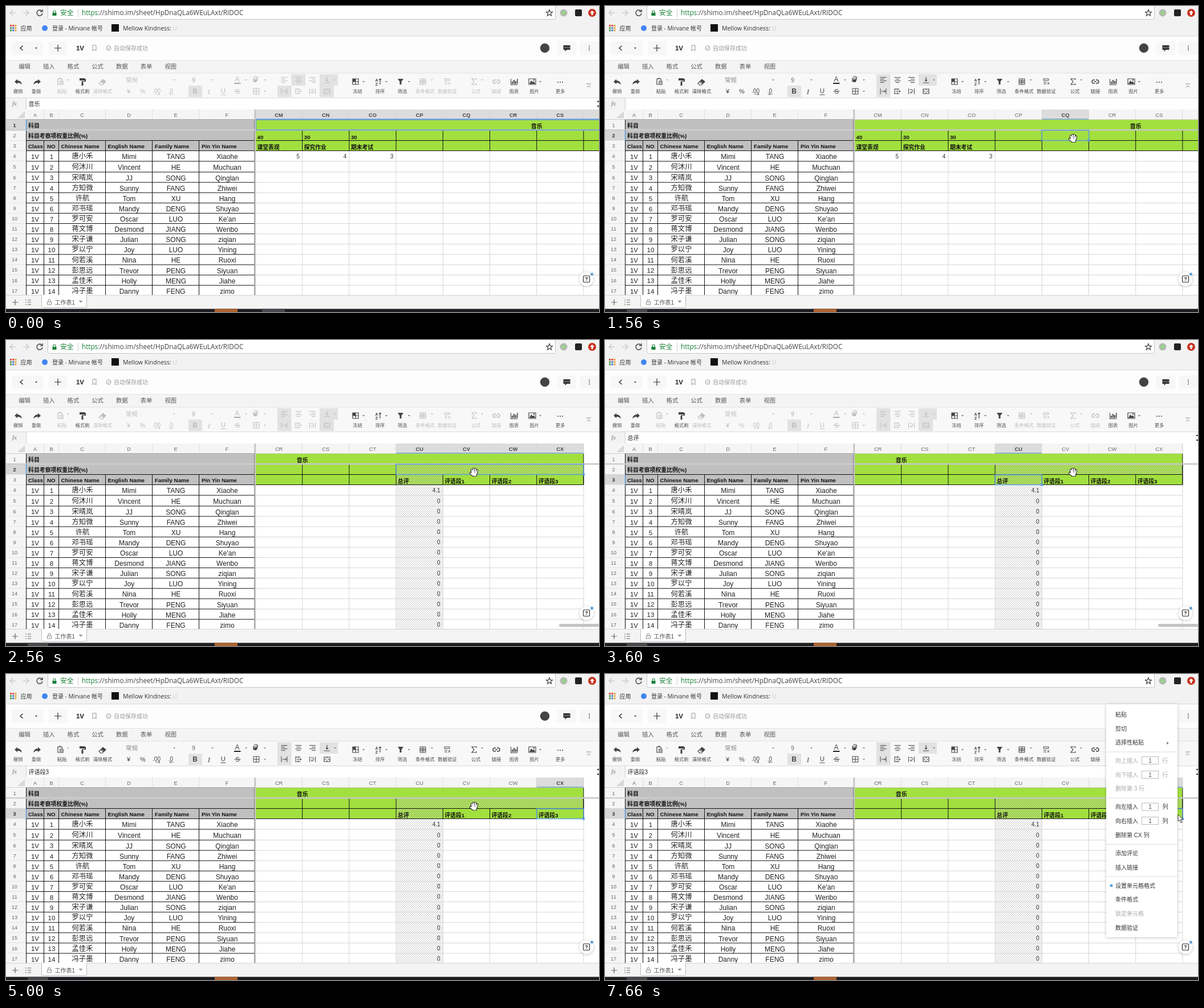
Write an HTML page that moves like this. It is 1040 by 538 pixels and loops after 8 s.

```html
<!DOCTYPE html>
<html lang="zh">
<head>
<meta charset="utf-8">
<title>Sheet</title>
<style>
html, body { margin: 0; width: 100%; height: 100%; overflow: hidden; background: #fff; }
svg { display: block; width: 1040px; height: 538px; font-family: "Liberation Sans", "Noto Sans CJK SC", "Noto Sans CJK", sans-serif; }
text { white-space: pre; }
.m { text-anchor: middle; }
.e { text-anchor: end; }
.b { font-weight: 700; }
.i { font-style: italic; }
.serif { font-family: "Liberation Serif", serif; }
.url { font-family: "Open Sans", "Noto Sans CJK SC", sans-serif; }
</style>
</head>
<body>
<svg id="stage" viewBox="0 0 1040 538"></svg>
<script>
const GREEN = '#a2e03f', BLUE = '#5b9be0', DARK = '#444', DIM = '#bdbdbd';
const COLS = ['CM', 'CN', 'CO', 'CP', 'CQ', 'CR', 'CS', 'CT', 'CU', 'CV', 'CW', 'CX'];
const PUPILS = `唐小禾 Mimi TANG Xiaohe
何沐川 Vincent HE Muchuan
宋晴岚 JJ SONG Qinglan
方知微 Sunny FANG Zhiwei
许航 Tom XU Hang
邓书瑶 Mandy DENG Shuyao
罗可安 Oscar LUO Ke'an
蒋文博 Desmond JIANG Wenbo
宋子谦 Julian SONG ziqian
罗以宁 Joy LUO Yining
何若溪 Nina HE Ruoxi
彭思远 Trevor PENG Siyuan
孟佳禾 Holly MENG Jiahe
冯子墨 Danny FENG zimo`.split('\n').map(s => s.split(' '));

// Each entry changes part of the state from its time on.
const TIMELINE = [
  [0, { scroll: 0, sel: [0, 11, 1], text: '音乐', off: true, align: 1, merge: true, task: 449 }],
  [200, { task: 38, cur: [480, 522] }],
  [390, { cur: [560, 440] }],
  [600, { cur: [680, 340] }],
  [800, { cur: [780, 262] }],
  [1000, { cur: [821, 233] }],
  [1180, { sel: [4, 4, 2], text: '', glow: true }],
  [1320, { off: false, align: 0, merge: false }],
  [1560, { glow: false }],
  [1950, { sel: [5, 5, 2] }],
  [2150, { sel: [6, 6, 2] }],
  [2350, { sel: [7, 7, 2], scroll: 1, bar: 905 }],
  [2560, { sel: [8, 11, 2], scroll: 5, bar: 970, off: true, merge: true }],
  [3600, { sel: [8, 8, 3], text: '总评' }],
  [3780, { bar: 0 }],
  [4380, { sel: [9, 9, 3], text: '评语段1', off: false, merge: false }],
  [4590, { sel: [10, 10, 3], text: '评语段2' }],
  [5000, { sel: [11, 11, 3], text: '评语段3' }],
  [5440, { cur: [835, 262] }],
  [5640, { cur: [880, 318] }],
  [5840, { cur: [930, 335] }],
  [6040, { cur: [965, 318] }],
  [6240, { cur: [985, 290] }],
  [6450, { cur: [995, 268] }],
  [6650, { cur: [1005, 253], glow: true }],
  [6860, { menu: true, cur: [1005, 247] }],
  [7060, { glow: false }]
];

const rect = (x, y, w, h, fill, more = '') =>
  `<rect x="${x}" y="${y}" width="${w}" height="${h}" fill="${fill}" ${more}/>`;
const circle = (x, y, r, fill, more = '') => `<circle cx="${x}" cy="${y}" r="${r}" fill="${fill}" ${more}/>`;
// y is the visual middle of the text
const text = (x, y, s, size = 10, fill = '#333', cls = '') =>
  `<text x="${x}" y="${y + size * .36}" font-size="${size}" fill="${fill}" class="${cls}">${s}</text>`;
const path = (x, y, d, stroke = DARK, fill = 'none', width = 1.2) =>
  `<path transform="translate(${x} ${y})" d="${d}" stroke="${stroke}" fill="${fill}" stroke-width="${width}"/>`;
const solid = (x, y, d, c = DARK) => path(x, y, d, 'none', c);
const hline = (x, y, x2, c, w = 1) => rect(x, y - w / 2, x2 - x, w, c);
const vline = (x, y, y2, c, w = 1) => rect(x - w / 2, y, w, y2 - y, c);
const drop = (x, y, c) => solid(x, y, 'M-2-1h4l-2 2.4z', c);
const range = (n, f) => Array.from({ length: n }, (_, i) => f(i)).join('');

const bottom = r => r < 6 ? [199.5, 218, 236.5, 254.5, 273, 292][r] : 292 + 18.1 * (r - 5);
const middle = r => r < 6 ? [0, 210, 228, 246, 264, 283][r] : 301.3 + 18.1 * (r - 6);

function browser() {
  const hues = ['#e04a3f', '#e04a3f', '#e8a33d', '#4a9a52', '#3f7fd0', '#e8a33d', '#4a9a52', '#3f7fd0', '#e8a33d'];
  return rect(0, 0, 1040, 53, '#f2f2f2') + rect(73.5, -2, 890, 25.5, '#fff', 'stroke="#c4c4c4" rx="2"')
    + path(12, 12, 'M5 0H-5M0-5L-5 0L0 5', '#ccc', 'none', 1.5)
    + path(35, 12, 'M-5 0H5M0-5L5 0L0 5', '#ccc', 'none', 1.5)
    + path(59, 12, 'M4-3A5 5 0 1 0 5 1M5-6v4h-4', '#555', 'none', 1.6)
    + solid(85, 13, 'M-3.5-1h7v5h-7z', '#188038') + path(85, 13, 'M-2-1v-2a2 2 0 0 1 4 0v2', '#188038')
    + text(95, 12, '安全', 11.8, '#188038') + vline(126.5, 5, 20, '#ccc')
    + text(133, 12, '<tspan fill="#188038">https</tspan>://shimo.im/sheet/HpDnaQLa6WEuLAxt/RIDOC', 11.7, '#444', 'url')
    + path(953, 12, 'M0-5.5L1.5-1.7 5.5-1.5 2.4 1 3.5 5 0 2.7-3.5 5-2.4 1-5.5-1.5-1.5-1.7z', '#444')
    + circle(978, 12, 6.5, '#b5b5b5') + circle(978, 12, 4, '#9bd08f')
    + rect(998, 6, 12, 12, '#222', 'rx="2"')
    + circle(1028, 12, 7, '#c8321f') + solid(1028, 12, 'M0-4L4 0H1.5V4h-3V0H-4z', '#fff')
    + hues.map((c, i) => rect(7 + i % 3 * 4.2, 33 + (i / 3 | 0) * 4.2, 3, 3, c)).join('')
    + text(25.5, 39, '应用') + circle(68, 39, 5, '#4285f4')
    + text(81, 39, '登录 - Mirvane 帐号', 10, '#333', 'url')
    + rect(185, 32, 13, 13, '#111')
    + text(205, 39, 'Mellow Kindness: <tspan fill="#ccc">U</tspan>', 10.5, '#333', 'url')
    + hline(0, 53, 1040, '#d0d0d0');
}

function header() {
  const tabs = ['编辑', '插入', '格式', '公式', '数据', '表单', '视图'];
  const panel = (x, w) => rect(x, 62, w, 24, '#f7f7f7', 'rx="2"');
  return rect(0, 53.5, 1040, 42, '#fdfdfd') + panel(10, 55) + panel(75, 32) + panel(967, 33) + panel(1007, 33)
    + path(27, 74, 'M2.5-4L-2 0l4.500 4', '#333', 'none', 1.5) + drop(53, 74, '#333')
    + path(91, 74, 'M-6 0H6M0-6V6', '#333') + text(130, 74, '1V', 11.5, '#222', 'm b')
    + path(155, 74, 'M-3-5h6v10l-3-3-3 3z', '#999', 'none', 1)
    + circle(180, 74, 4, 'none', 'stroke="#999"') + path(180, 74, 'M-2 0l1.500 1.500 3-3', '#999', 'none', 1)
    + text(189, 74, '自动保存成功', 10, '#999')
    + circle(945, 74, 8.2, '#444')
    + solid(983.500, 74, 'M-6-5h12v8h-6l-3 3v-3h-3z', '#333')
    + [-3.500, 0, 3.500].map(d => circle(984 + d, 73, .8, '#fff') + circle(1023, 74 + d, .9, '#444')).join('')
    + rect(0, 95.5, 1040, 22.500, '#f4f4f4') + hline(0, 95.500, 1040, '#e4e4e4')
    + tabs.map((s, i) => text(32.500 + 42.700 * i, 106, s, 10.3, '#555', 'm')).join('');
}

function toolbar({ off, align, merge }) {
  const c = off ? DIM : DARK;
  const box = (x, y, w) => rect(x, y, w, 20, '#e2e2e2');
  const bars = (x, y, shift) => range(4, i => {
    const w = i % 2 ? 7 : 11;
    return hline(x - 5.5 + (11 - w) * shift / 2, y - 4.500 + i * 3, x - 5.5 + (11 - w) * shift / 2 + w, c);
  });
  const grid = 'M-5-5H5V5H-5zM-5 0H5M0-5V5', undo = 'M-7-1l5-4.500v2.500q7 0 8 7.500q-3-4-8-3.500v2.500z';
  const labels = [
    [21, '撤销'], [53, '重做'], [98, '粘贴', c], [134, '格式刷'], [169.500, '清除格式', c], [616.500, '冻结'], [656, '排序'],
    [695, '筛选'], [735, '条件格式', c], [774, '数据验证', c], [824, '公式', c], [860, '链接', c], [891, '图表'],
    [926.500, '图片'], [972, '更多']];
  return rect(0, 118, 1040, 43.500, '#f8f8f8') + hline(0, 118, 1040, '#e2e2e2') + hline(0, 161.500, 1040, '#d8d8d8')
    + labels.map(([x, s, col = '#555']) => text(x, 150, s, 8.4, col, 'm')).join('')
    + solid(22, 134, undo) + `<g transform="matrix(-1 0 0 1 54 134)">${solid(0, 0, undo)}</g>`
    + path(95, 133, 'M3-2v-3h-7V5h3M-2-6h3M0-1h5v6h-5zM1.500 1h2M1.500 3h2', c)
    + solid(134, 133, 'M-5-6h9v4h-9zM4-5h2v5h-5v2h-2v-3h5zM-1.500 1h3v6h-3z')
    + path(169, 134, 'M-6 2L1-5l5 4-6 6h-3zM-3-1l5 4', c) + solid(169, 134, 'M-2-2L1-5l5 4-3 3.500z', c)
    + text(210, 130, '常规', 10.5, off ? DIM : '#888')
    + text(215, 150, '¥', 11, c, 'm') + text(240, 150, '%', 11, c, 'm')
    + text(264, 149, '.00', 10, c, 'm') + text(289, 149, '.0', 10, c, 'm')
    + path(266, 155, 'M-4 0h8M2-2l2 2-2 2', c, 'none', .8) + path(290, 155, 'M4 0h-7M-1-2l-2 2 2 2', c, 'none', .8)
    + text(329, 130, '9', 10, off ? '#aaa' : '#666', 'm')
    + box(320, 140, 24) + text(331.500, 150, 'B', 12, c, 'm b') + text(356, 150, 'I', 13, c, 'm i serif')
    + text(381, 149, 'U', 11.500, c, 'm') + hline(376.500, 156, 385.500, c)
    + text(406, 150, 'S', 11.500, c, 'm') + hline(400.500, 150, 411.500, c)
    + text(405.500, 129, 'A', 12, c, 'm') + hline(400, 136, 411.500, off ? '#aaa' : '#222', 2)
    + path(438, 129, 'M-4-2h7l-3 6h-4zM-3-5h5l2 3', c) + solid(438, 129, 'M-4 0h8l-3 5h-3z', c)
    + path(439, 150, grid, c, 'none', 1)
    + box(476 + 24.500 * align, 120, 24.500) + box(550, 120, 32) + box(476, 140, 24.500) + (merge ? box(550, 140, 25) : '')
    + bars(488, 130, 0) + bars(513, 130, 1) + bars(537.500, 130, 2)
    + path(563, 130, 'M-5 5H5M0-5V2M-2 0l2 2 2-2', c)
    + path(488, 150, 'M-5-5V5M5-5V5M-3 0H4M2-2l2 2-2 2', c, 'none', 1)
    + path(513, 150, 'M-5-5V5M0-5v3M0 2v3M-3 0H5M3-2l2 2-2 2M-5-4h8M-5 4h8', c, 'none', 1)
    + path(537.500, 150, 'M-5-5V5M5-5V5M-3-3H1q3 3 0 5h-3M0 0l-2 2 2 2', c, 'none', 1)
    + path(563, 150, 'M-5-4H5V4H-5zM0-4v2M0 2v2M-4 0h3M4 0H1', c)
    + path(613, 133, grid) + solid(613, 133, 'M-5-5H0V0H-5z')
    + text(650, 130, 'A', 7, DARK, 'm b') + text(650, 137, 'Z', 7, DARK, 'm b') + path(656, 133, 'M0 5V-5M-2-3l2-2 2 2')
    + solid(692, 133, 'M-5-5H5L1.500 0v5h-3v-5z')
    + path(731, 133, grid + 'M-5-2H5M-5 2H5', c, 'none', 1)
    + path(774, 133, 'M-5-5H4V-2H-5zM-5 1H0M-5 4H0M2 1l3 4M5 1l-3 4', c, 'none', 1)
    + path(821, 133, 'M4-3v-2H-4L0 0-4 5H4V3', c)
    + path(860, 133, 'M-1-3h-2a3 3 0 0 0 0 6h2M1-3h2a3 3 0 0 1 0 6h-2M-2 0h4', c, 'none', 1.4)
    + solid(891, 133, 'M-6-5h1V5H6v1H-6zM-4 0h2v4h-2zM-1-3h2v7h-2zM2-1h2v5h-2zM5-5h1.500v9h-1.500z')
    + path(923, 133, 'M-6-5H6V5H-6z') + solid(923, 133, 'M-5 4l3-6 3 3 2-2 2 5zM2-4h2v2h-2z')
    + [968, 972, 976].map(x => circle(x, 134, 1, DARK)).join('')
    + path(1022, 140, 'M-4-3h8M-3 3l3-3 3 3', '#888', 'none', 1)
    + [109, 295, 362, 421, 454, 577, 747, 835].map(x => drop(x, 130, x === 109 ? DIM : off ? '#c4c4c4' : '#888')).join('')
    + drop(454, 150, off ? '#c4c4c4' : '#888')
    + [627, 667, 707, 937].map(x => drop(x, 133, '#777')).join('');
}

function formulaBar({ text: value }) {
  return rect(0, 162, 1040, 20, '#fff') + rect(0, 162, 35, 20, '#f3f3f3') + vline(35.500, 162, 182, '#d0d0d0')
    + text(15, 171, 'fx', 11, '#777', 'm i serif') + text(39.500, 172, value, 10, '#222')
    + (value ? solid(1038, 168, 'M-2 1h5L.500-2z') + solid(1038, 176, 'M-2-1h5L.500 2z') : '');
}

function columnHead(x, w, label, on) {
  return rect(x, 182, w, 17.500, on ? '#dcdcdc' : '#f5f5f5') + vline(x + w, 182, 199.500, '#c8c8c8')
    + text(x + w / 2, 191.500, label, 9.3, on ? '#444' : '#666', on ? 'm b' : 'm')
    + (on ? hline(x, 199, x + w, BLUE, 1.500) : '');
}

function scrollPane({ scroll, sel: [from, to, row], bar }) {
  const at = i => 437.500 + 82.200 * (i - scroll), end = at(12), last = Math.min(end, 1040);
  const rows = [['40', '30', '30'], ['课堂表现', '探究作业', '期末考试', '', '', '', '', '', '总评', '评语段1', '评语段2', '评语段3']];
  const left = Math.max(at(from), 438.500), top = bottom(row - 1) + .5, h = bottom(row) - top;
  const hatch = (x, y, w, h) => rect(x, y, w, h, 'url(#hatch)');
  return rect(437, 182, 603, 326, '#fff') + rect(437, 200, last - 437, 54.500, GREEN)
    + hatch(at(8), 219, 328.800, 17.500) + hatch(at(8), 237, 82.200, 271)
    + COLS.map((name, i) => columnHead(at(i), 82.200, name, i >= from && i <= to)).join('')
    + hline(437, 199.500, last, '#b8b8b8', .6)
    + range(14, i => hline(437, bottom(i + 4), last, '#d6d6d6'))
    + range(12, i => vline(at(i + 1), 255, 508, '#d6d6d6')
      + vline(at(i + 1), i > 7 && i < 11 ? 237 : 219, 254.500, '#111'))
    + vline(end, 200, 254.500, '#111') + hline(437, 236.500, last, '#111') + hline(437, 254.500, last, '#111')
    + text(at(6), 211.500, '音乐', 10, '#111', 'm b')
    + rows.map((list, r) => list.map((s, i) => text(at(i) + 3, 230 + 18 * r, s, 9.8, '#111', 'b')).join('')).join('')
    + [5, 4, 3].map((n, i) => text(at(i) + 77.500, 264, n, 10, '#333', 'e')).join('')
    + range(14, i => text(at(8) + 77.500, middle(i + 4), i ? 0 : '4.1', 10, '#333', 'e'))
    + hline(0, 218, 1040, '#c6c6c6', 2.500)
    + rect(left, top, at(to + 1) - left, h, 'none', `stroke="${BLUE}" stroke-width="1.5"`)
    + rect(at(to + 1) - 2, top + h - 2, 4, 4, BLUE)
    + (bar ? rect(bar, 499, 1040 - 970, 5.500, '#c4c4c4', 'rx="2.500"') : '');
}

function fixedPane({ sel: [, , row] }) {
  const edges = [35.500, 66.500, 92.500, 174.500, 256.500, 338.500, 436], mids = [51, 80, 134, 216, 298, 388];
  const titles = ['Class', 'NO', 'Chinese Name', 'English Name', 'Family Name', 'Pin Yin Name'];
  return rect(0, 182, 436.500, 326, '#fff') + rect(35.500, 200, 401, 54.500, '#c0c0c0')
    + [...'ABCDEF'].map((s, i) => columnHead(edges[i], edges[i + 1] - edges[i], s)).join('')
    + rect(0, 182, 35.500, 18, '#f5f5f5') + solid(33, 197, 'M0 0V-12L-13 0z', '#d8d8d8')
    + hline(0, 199.500, 437, '#a8a8a8')
    + range(17, i => {
      const r = i + 1, on = r === row, top = bottom(i);
      return rect(0, top, 35, bottom(r) - top, on ? '#d6d6d6' : '#f5f5f5') + hline(0, bottom(r), 35, '#d4d4d4')
        + text(15, middle(r), r, 9, on ? '#333' : '#666', on ? 'm b' : 'm');
    })
    + range(16, i => hline(35, bottom(i + 2), 436, '#111'))
    + edges.map((x, i) => vline(x, i % 6 ? 236.500 : 200, 508, '#111')).join('')
    + text(39, 210, '科目', 9.900, '#111', 'b') + text(39, 228, '科目考察项权重比例(%)', 9.900, '#111', 'b')
    + titles.map((s, i) => text([39, 72, 96.500, 178.500, 261, 343][i], 246, s, 9.750, '#111', 'b')).join('')
    + PUPILS.map((p, i) => ['1V', i + 1, ...p].map((s, k) =>
      text(mids[k], middle(i + 4) + (k === 2 ? 0 : 1), s, k === 2 ? 12.300 : k < 2 ? 11.500 : 12, '#222', 'm')).join('')).join('')
    + hline(0, 218, 437, '#cdcdcd', 2.500) + vline(437, 182, 508, '#c4c4c4', 2.500)
    + vline(35.500, bottom(row - 1), bottom(row), BLUE, 1.500);
}

function footer({ task }) {
  return rect(0, 508, 1040, 25, '#f4f4f4') + hline(0, 508.500, 1040, '#d4d4d4')
    + path(16, 521, 'M-5 0H5M0-5V5', '#666') + path(39, 521, 'M-5-4h2M-1-4h6M-5 0h2M-1 0h6M-5 4h2M-1 4h6', '#666')
    + path(62.500, 508, 'M0 0V20q0 2 2 2H77q2 0 2-2V0', '#bbb', '#fff', 1)
    + path(76, 521, 'M-3.500-1h7v5h-7zM-2-1v-2a2 2 0 0 1 4 0v2M0 1v1', '#888', 'none', 1)
    + text(85.500, 521, '工作表1', 10, '#555') + solid(131, 520, 'M-3.500-2h7l-3.500 4z', '#999')
    + circle(1018, 480, 12, '#fff', 'filter="url(#shade)"') + rect(1012.500, 474.500, 11, 11, 'none', 'stroke="#333" stroke-width="1.2" rx="1"')
    + text(1018, 480, '?', 9, '#222', 'm b') + circle(1027.500, 471.500, 2.500, '#5a9fd8')
    + rect(0, 532.500, 1040, 6, '#1d1d22') + rect(366, 532.500, 40, 6, '#ad632f') + rect(task, 532.500, task < 99 ? 36 : 40, 6, '#48484c')
    + text(971, 540.500, '20:20', 9, '#ddd', 'm');
}

function contextMenu() {
  const items = [[71, '粘贴'], [96, '剪切'], [120, '选择性粘贴'], [152, '向上插入', '行', 1], [177, '向下插入', '行', 1],
    [201, '删除第 3 行', '', 1], [233.500, '向左插入', '列'], [258, '向右插入', '列'], [283, '删除第 CX 列'], [315, '添加评论'],
    [340, '插入链接'], [372, '设置单元格格式'], [396, '条件格式'], [421, '锁定单元格', '', 1], [446, '数据验证']];
  return rect(879, 53, 125, 409.500, '#fff', 'filter="url(#shade)"')
    + [137, 218, 299.500, 356].map(y => hline(879, y, 1004, '#ddd')).join('')
    + items.map(([y, label, unit, dim]) => {
      const c = dim ? '#aaa' : '#333';
      return text(895, y, label, 10, c) + (unit ? rect(941.500, y - 6.500, 29, 13, '#fff', 'stroke="#bbb"')
        + text(956, y, 1, 10, '#555', 'm') + text(977.500, y, unit, 10, c) : '');
    }).join('')
    + solid(987, 121.500, 'M-1.500-2.500v5l3-2.500z', '#666') + circle(888, 372, 2.500, '#5a9fd8');
}

function cursor({ cur, glow, menu }) {
  if (!cur) return '';
  const [x, y] = cur, spot = glow ? circle(x + 1, menu ? 252.500 : y, 9, '#f0e31c', 'opacity=".85"') : '';
  if (menu) return spot + path(x, y, 'M0 0V12l2.800-2.500 2.200 5 2-1-2.200-4.700h4z', '#222', '#fff', .9);
  const fingers = glow ? 'M-4 1V-2M-1.400 0V-3M1.400 0V-3M4 1V-2M-4 3L-5 1'
    : 'M-3 1L-4-4M-1 0L-1.300-6M1.700 0L2-6M4 1L5-3.500M-3 4L-6 1';
  const hand = (c, w) => path(x, y, fingers + 'M-2.500 2H3V5H-1.500z', c, c, w);
  return spot + `<g stroke-linecap="round" stroke-linejoin="round">${hand(glow ? '#6b6410' : '#111', 4.200)}${hand('#fff', 2.300)}</g>`;
}

const defs = `<defs><pattern id="hatch" width="4" height="4" patternUnits="userSpaceOnUse">
  <path d="M0 0h2v2H0zM2 2h2v2H2z" fill="#bbb" opacity=".5"/></pattern>
  <filter id="shade" x="-20%" y="-20%" width="140%" height="140%">
  <feDropShadow dx="0" dy="1" stdDeviation="2.5" flood-opacity=".25"/></filter></defs>`;
const stage = document.getElementById('stage');
const fixed = defs + browser() + header();
let shown = 0;

function frame() {
  const now = performance.now() % 8000;
  const past = TIMELINE.filter(([start]) => start <= now);
  if (past.length !== shown) {
    shown = past.length;
    const state = Object.assign({}, ...past.map(([, change]) => change));
    stage.innerHTML = fixed + toolbar(state) + formulaBar(state) + scrollPane(state) + fixedPane(state)
      + footer(state) + (state.menu ? contextMenu() : '') + cursor(state);
  }
  requestAnimationFrame(frame);
}
frame();
</script>
</body>
</html>
```
